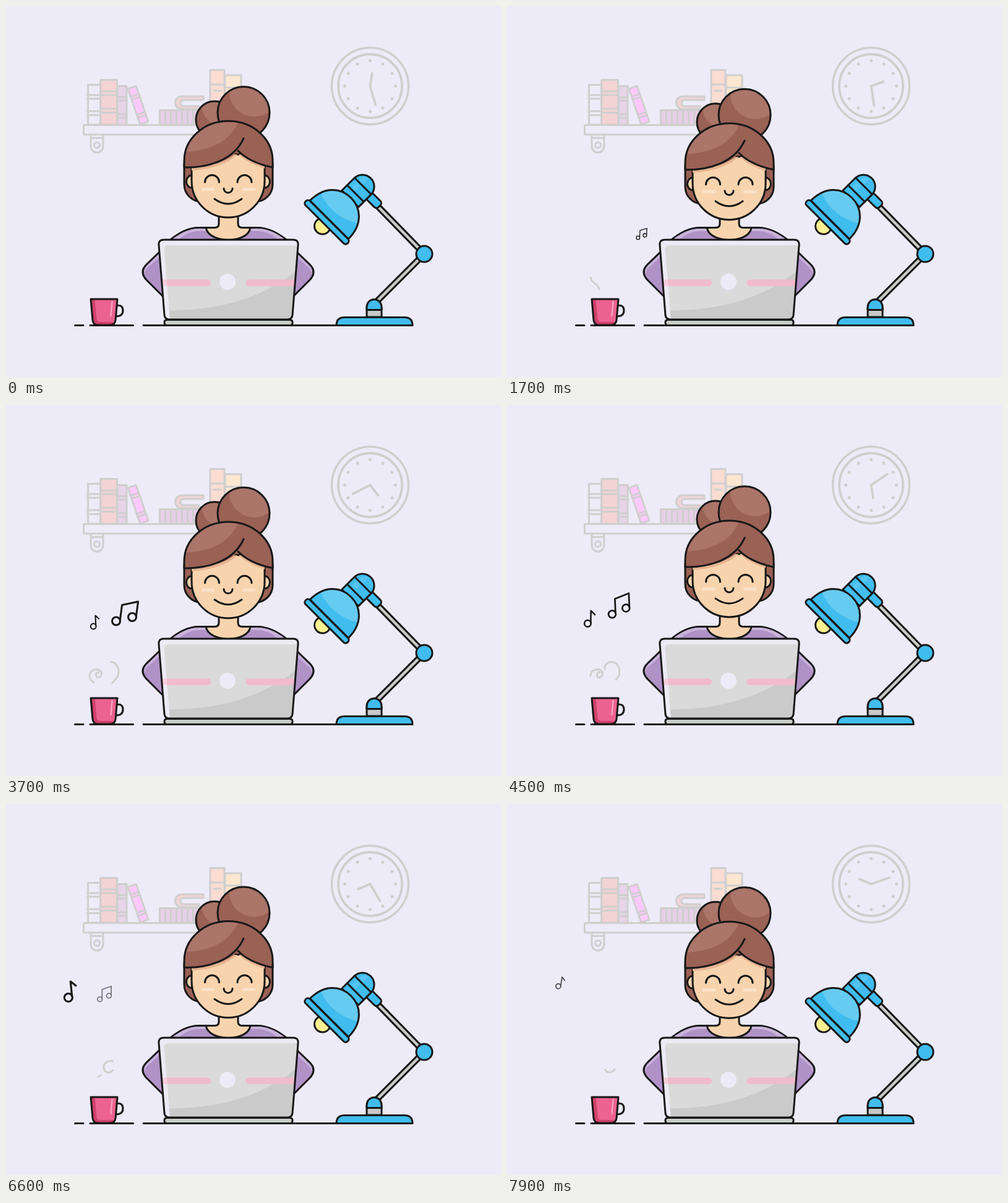
Write an HTML page that moves like this. It is 800 by 600 pixels and loops after 8 s.

```html
<!DOCTYPE html>
<html lang="en">
<head>
<meta charset="utf-8">
<title>Working at the desk</title>
<style>
html, body { margin: 0; width: 100%; height: 100%; overflow: hidden; background: #edebf7; }
svg { display: block; width: 800px; height: 600px; }
.ink { stroke: #171717; stroke-width: 3; stroke-linecap: round; stroke-linejoin: round; }
.pale { stroke: #cfcfcf; stroke-width: 3; stroke-linecap: round; stroke-linejoin: round; }
.line { fill: none; }
.blue { fill: #40bdee; }
.hair { fill: #9a6155; }
.shine { fill: #ab7569; }
.skin { fill: #f8d4ae; }
.wool { fill: #b092c6; }
.wool-light { fill: #c8b3da; }
.paper { fill: #edebf7; }
</style>
</head>
<body>
<svg viewBox="0 0 800 600">
  <defs>
    <clipPath id="bigBun"><circle cx="384" cy="172.5" r="42"/></clipPath>
    <clipPath id="smallBun"><circle cx="337" cy="184" r="30"/></clipPath>
    <clipPath id="fringe"><path id="fringeShape" d="M288 261V250A71.5 64 0 0 1 431 250V261C405 256 385 245 375 234C360 252 325 262 288 261Z"/></clipPath>
    <clipPath id="face"><path d="M300 240V283A59 59 0 0 0 418 283V240Z"/></clipPath>
    <clipPath id="lid"><path d="M255 378H464Q473 378 472 387L463 500Q462 507 455 507H264Q257 507 256 500L247 387Q246 378 255 378Z"/></clipPath>
    <clipPath id="cup"><path d="M137 474H180L177 508Q176 516 168 516H149Q141 516 140 508Z"/></clipPath>
    <clipPath id="dome"><path d="M-44 -4C-44 -38 -22 -54 0 -54S44 -38 44 -4Z"/></clipPath>
  </defs>

  <g id="shelf" class="pale">
    <rect class="paper" x="125.5" y="192.5" width="270" height="15.5" rx="1.5"/>
    <path class="line" d="M137 208V227A10 10 0 0 0 157 227V208M137 213.5H157"/>
    <circle class="line" cx="147" cy="225" r="4.5"/>
    <rect class="paper" x="132.5" y="127.5" width="20" height="64.5"/>
    <path class="line" d="M131.500 144H152M131.500 150H152M131.500 170H152M131.500 176.500H152"/>
    <rect fill="#f3d3d4" x="152.500" y="119.500" width="27" height="72.500" rx="1"/>
    <path class="line" d="M152 138H180M152 144H180M152 166H180M152 172.500H180"/>
    <rect fill="#e7d4e8" x="180" y="129.500" width="15" height="62.500"/>
    <path class="line" d="M180 147.500H195M180 153H195M180 175H195M180 181H195"/>
    <g transform="translate(213.500 160.500) rotate(-19)">
      <rect fill="#ffc9fd" x="-7" y="-30.500" width="14" height="61" rx="1"/>
      <path class="line" d="M-7 -17H7M-7 -12H7M-7 14H7M-7 19H7"/>
    </g>
    <rect fill="#e7cfe8" x="248.500" y="168.500" width="72" height="23.500"/>
    <path id="spines" class="line"/>
    <path fill="#f1d5d6" d="M319 146H284A10.500 10.500 0 0 0 284 167H312V162H287A5 5 0 0 1 287 152H319Z"/>
    <rect fill="#fadcd2" x="330" y="103.500" width="23" height="88"/>
    <path class="line" d="M330 127H353M336 137H347"/>
    <rect fill="#fde7d0" x="354" y="112" width="26" height="80"/>
    <path class="line" d="M354 132H380"/>
  </g>

  <g transform="translate(588.500 129.500)">
    <g class="pale line">
      <circle r="62" stroke-width="3.500"/>
      <circle r="51.500" style="stroke-width:3.800"/>
    </g>
    <g id="dots" fill="#cfcfcf"></g>
    <g class="pale" style="stroke-width:3.800">
      <path id="hour" d="M0 0V-21"/>
      <path id="minute" d="M0 0V-31.500"/>
    </g>
  </g>

  <g class="head">
    <rect class="hair ink" x="288" y="230" width="143" height="86.500" rx="28"/>
    <circle class="hair" cx="337" cy="184" r="30"/>
    <circle class="shine" cx="350" cy="160" r="34" clip-path="url(#smallBun)"/>
    <circle class="line ink" cx="337" cy="184" r="30"/>
    <circle class="hair" cx="384" cy="172.500" r="42"/>
    <circle class="shine" cx="401" cy="139" r="40" clip-path="url(#bigBun)"/>
    <circle class="line ink" cx="384" cy="172.500" r="42"/>
  </g>

  <g id="body">
    <path class="wool ink" d="M262 381C280 366 295 358.500 312 358.500H406C423 358.500 439 366 457 381Z"/>
    <path class="wool-light" d="M270 376C284 366 297 360 312 360H323L325 364H314C299 364 288 370 280 377ZM449 376C435 366 422 360 407 360H396L394 364H405C420 364 431 370 439 377Z"/>
    <path class="skin" d="M344 335V352Q344 359 337 359H323C328 386 391 386 395 359H382Q375 359 375 352V335Z"/>
    <path class="line ink" d="M344 335V352Q344 358.500 337 358.500H323C328 385 391 385 395 358.500H382Q375 358.500 375 352V335"/>
    <path id="arm" class="wool ink" d="M254 392L227 418Q215 430 227 443L262 478Z"/>
    <path class="wool-light" d="M250 398.500L228.500 419.500Q222 427 223.500 433L227 425L250 404Z"/>
    <path class="wool ink" d="M464 392L491 418Q503 430 491 443L456 478Z"/>
    <path class="wool-light" d="M468 398.500L489.500 419.500Q496 427 494.500 433L491 425L468 404Z"/>
  </g>

  <g class="head">
    <ellipse class="skin ink" cx="300" cy="284" rx="8.500" ry="10"/>
    <ellipse class="skin ink" cx="418" cy="284" rx="8.500" ry="10"/>
    <path class="skin ink" d="M300 240V283A59 59 0 0 0 418 283V240Z"/>
    <path fill="#e5b592" clip-path="url(#face)" d="M288 266C325 267 360 256 375 239C385 250 405 261 431 266V240H288Z"/>
    <path class="hair" d="M288 261V250A71.500 64 0 0 1 431 250V261C405 256 385 245 375 234C360 252 325 262 288 261Z"/>
    <path class="shine" clip-path="url(#fringe)" d="M285 236C330 235 362 220 376 186H285Z"/>
    <path class="line ink" d="M288 261V250A71.500 64 0 0 1 431 250V261C405 256 385 245 375 234M288 261C325 262 368 250 384 214"/>
    <path fill="#fae1ca" d="M316 294H337V299H316ZM382 294H403V299H382Z"/>
    <path class="line ink" d="M321.500 285A11.500 11.500 0 0 1 344.500 285M374 285A11.500 11.500 0 0 1 397 285M352 295A7 7 0 0 0 366 295M337 312Q359 328 381 312"/>
  </g>

  <g id="laptop">
    <g clip-path="url(#lid)">
      <rect fill="#dadada" x="240" y="370" width="240" height="140"/>
      <path fill="#cacaca" d="M256 492C350 495 425 467 474 424V510H256Z"/>
      <path fill="#f1bacd" d="M245 442.500H326A5 5 0 0 1 326 453H245ZM474 442.500H392.500A5 5 0 0 0 392.500 453H474Z"/>
      <path fill="#ecebf5" d="M245 376H474V387H262Q255 387 255.500 394L265 508H254Z"/>
      <path fill="#f7cfdd" d="M250 442.500H259.500L260.500 453H250Z"/>
    </g>
    <path class="line ink" d="M255 378H464Q473 378 472 387L463 500Q462 507 455 507H264Q257 507 256 500L247 387Q246 378 255 378Z"/>
    <circle class="paper" cx="358" cy="446" r="13"/>
    <path class="line ink" d="M111.500 516.500H125M136 516.500H205.500M222 516.500H656"/>
    <rect fill="#c9cdc7" class="ink" x="256" y="507.500" width="207" height="9" rx="4"/>
  </g>

  <g id="mug">
    <path class="line ink" d="M179 484.500Q189 483 189 492.500Q189 502 177 502"/>
    <g clip-path="url(#cup)">
      <rect fill="#ec6290" x="130" y="470" width="55" height="50"/>
      <path fill="#cf416b" d="M134 470H143L146.500 506Q147 511 153 511H180V520H134Z"/>
      <path stroke="#f6a3bf" stroke-width="2.500" stroke-linecap="round" d="M171.500 478L169.500 501"/>
    </g>
    <path class="line ink" d="M137 474H180L177 508Q176 516 168 516H149Q141 516 140 508Z"/>
  </g>

  <g id="lamp">
    <g class="line" stroke-linecap="round">
      <path stroke="#171717" stroke-width="10.500" d="M599 478L676 401L600 323"/>
      <path stroke="#c9cbc6" stroke-width="4.500" d="M599 478L676 401L600 323"/>
    </g>
    <g class="ink">
      <rect fill="#c9c9c9" x="583" y="488" width="24" height="15"/>
      <path class="blue" d="M583 491.500V486.500A12 12 0 0 1 607 486.500V491.500Z"/>
      <path class="blue" d="M534 516.500Q534 503.500 547 503.500H644Q657 503.500 657 516.500Z"/>
      <circle class="blue" cx="676" cy="401" r="13"/>
      <circle fill="#fdf091" cx="511.500" cy="356" r="13"/>
    </g>
    <g transform="translate(519.500 348.500) rotate(45)">
      <rect class="blue ink" x="14" y="-84" width="28" height="14" rx="5"/>
      <path class="blue ink" d="M-19 -52V-80A19 19 0 0 1 19 -80V-52Z"/>
      <path fill="#68cdf3" d="M-12 -83A13 13 0 0 1 -2 -96V-83ZM-12 -78H-3V-67H-12Z" opacity=".5"/>
      <path class="line ink" d="M-19 -64H19M-19 -81H19"/>
      <path class="blue" d="M-44 -4C-44 -38 -22 -54 0 -54S44 -38 44 -4Z"/>
      <path fill="#66cbf1" clip-path="url(#dome)" d="M-50 -29Q0 -4 48 -40V-60H-50Z"/>
      <path class="line ink" d="M-44 -4C-44 -38 -22 -54 0 -54S44 -38 44 -4Z"/>
      <rect class="blue ink" x="-48" y="-3.500" width="96" height="10" rx="4.500"/>
    </g>
  </g>

  <g class="pale line">
    <path id="steamLeft" pathLength="1" d="M149 458C147 447 136 450 135 438C135 426 153 424 154.500 434C155 442 145 443 145.500 436C145.500 433 148 431 150 433"/>
    <path id="steamRight" pathLength="1" d="M167 458C170 449 178 445 181 437C184 428 179 416 170 415.500C162 415.500 157.500 420 158 427C159 435 168 437 174 429"/>
  </g>
  <g id="pair" class="ink line">
    <circle cx="-17.800" cy="16" r="6.500"/><circle cx="8.200" cy="9.500" r="6.500"/>
    <path d="M-11.500 14.500L-8.300 -10L17.700 -15.500L14.500 8.500"/>
  </g>
  <g id="single" class="ink line">
    <circle cx="-4" cy="12" r="6.300"/>
    <path d="M2 11L4 -12L11 -4"/>
  </g>
</svg>
<script>
const LOOP = 8000, STEP = 100;
const $ = id => document.getElementById(id);

// seconds, x, y, scale, turn, opacity
const PAIR = [
  [0.9, 225, 374, 0.1, 0, 0],
  [1.3, 222, 371, 0.28, -1, 1],
  [1.7, 218.9, 367, 0.44, -5, 1],
  [2.7, 207.1, 358.1, 0.77, -17, 1],
  [3.7, 195.8, 333.5, 1, 0, 1],
  [5.4, 169.5, 307.3, 0.81, -21, 1],
  [6.6, 160.9, 305.1, 0.59, -7, 0.55],
  [7.3, 156, 303, 0.4, 0, 0]
];
const SINGLE = [
  [2.3, 147, 351, 0.3, -4, 0],
  [2.7, 145.7, 350.3, 0.42, -8, 0.6],
  [3.7, 142.8, 349.3, 0.7, -8, 1],
  [5.4, 122, 336, 1, 0, 1],
  [6.6, 102.5, 300, 1.04, -11, 1],
  [7.9, 86, 287.3, 0.63, 4, 0.72]
];
// seconds, trim start, trim end
const STEAM_LEFT = [
  [0.7, 0, 0], [1.7, 0, 0.32], [2.7, 0.06, 0.55], [3.7, 0.16, 1],
  [5.4, 0.52, 1], [6.6, 0.76, 0.82], [6.9, 0.84, 0.84]
];
const STEAM_RIGHT = [
  [1.9, 0, 0], [2.7, 0, 0.24], [3.7, 0.1, 0.57], [5.4, 0.27, 1],
  [6.6, 0.54, 0.98], [7.9, 0.8, 1]
];

function sample(keys, s) {
  if (s <= keys[0][0]) return keys[0].slice(1);
  for (let i = 1; i < keys.length; i++) {
    const a = keys[i - 1], b = keys[i];
    if (s <= b[0]) {
      const p = (s - a[0]) / (b[0] - a[0]);
      return a.slice(1).map((v, k) => v + (b[k + 1] - v) * p);
    }
  }
  return keys[keys.length - 1].slice(1);
}

function placeNote(id, keys, s) {
  const [x, y, scale, turn, opacity] = sample(keys, s);
  $(id).setAttribute("transform", `translate(${x} ${y}) rotate(${turn}) scale(${scale})`);
  $(id).setAttribute("opacity", opacity);
}

function trim(id, keys, s) {
  const [from, to] = sample(keys, s);
  const el = $(id);
  el.setAttribute("visibility", to - from > 0.002 ? "visible" : "hidden");
  el.setAttribute("stroke-dasharray", `${to - from} 2`);
  el.setAttribute("stroke-dashoffset", -from);
}

function build() {
  let dots = "", spines = "";
  for (let i = 0; i < 12; i++) dots += `<circle cy="-41" r="2.5" transform="rotate(${i * 30})"/>`;
  for (let x = 257.5; x < 320; x += 9) spines += `M${x} 168.5V192`;
  $("dots").innerHTML = dots;
  $("spines").setAttribute("d", spines);
}

function draw(ms) {
  const s = ms / 1000;
  const wave = Math.abs(Math.sin(Math.PI * s / 5));
  const bob = 2.25 * (wave + wave * wave);
  for (const el of document.querySelectorAll(".head")) {
    el.setAttribute("transform", `translate(0 ${bob})`);
  }
  $("hour").setAttribute("transform", `rotate(${9 + 36 * s})`);
  $("minute").setAttribute("transform", `rotate(${164 + 216 * s})`);
  placeNote("pair", PAIR, s);
  placeNote("single", SINGLE, s);
  trim("steamLeft", STEAM_LEFT, s);
  trim("steamRight", STEAM_RIGHT, s);
}

build();
draw(0);
const start = performance.now();
function tick() {
  const ms = (performance.now() - start) % LOOP;
  draw(Math.floor(ms / STEP) * STEP);
  requestAnimationFrame(tick);
}
requestAnimationFrame(tick);
</script>
</body>
</html>
```
